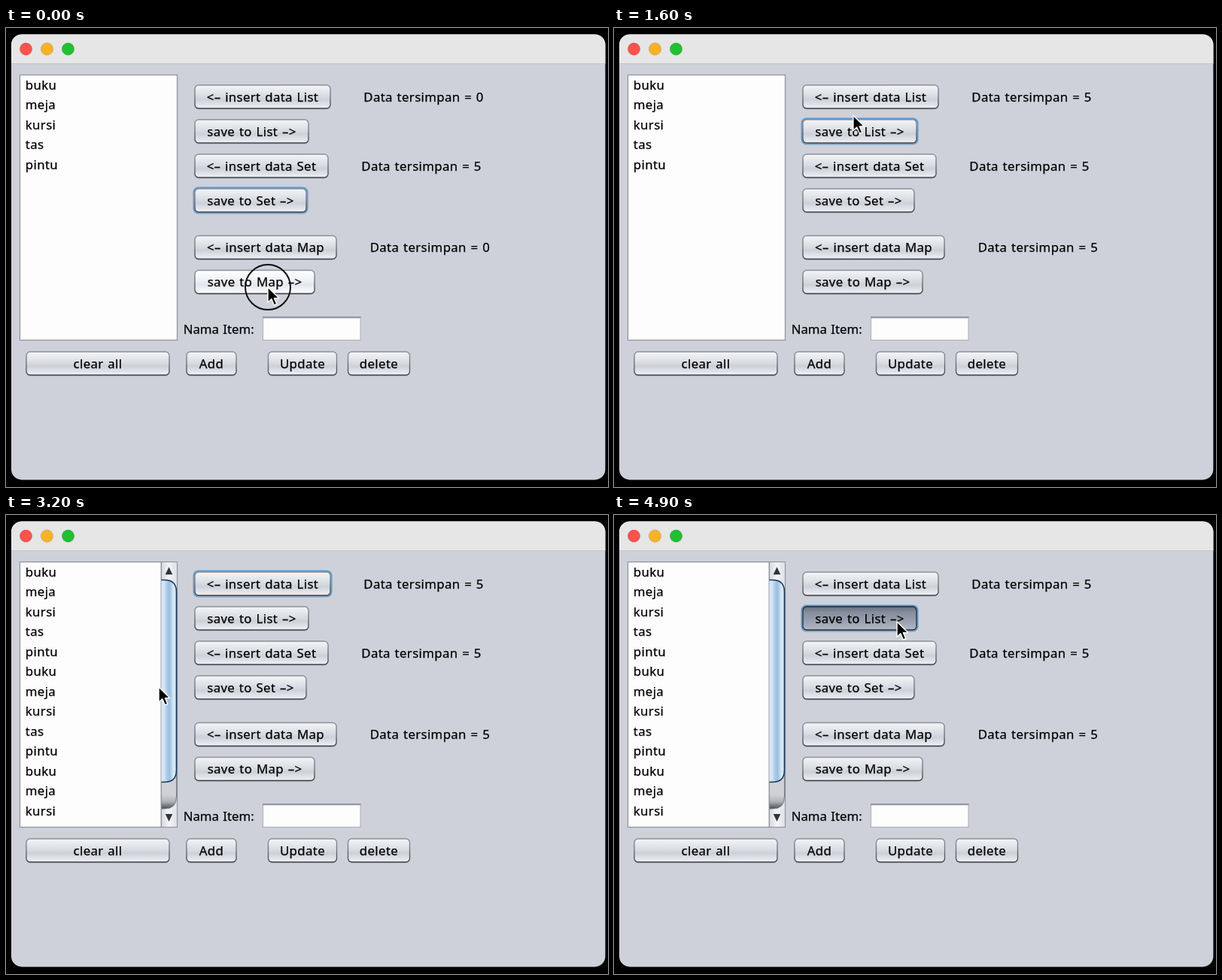
An HTML page that plays this animation: 800 by 611 pixels, repeating every 5 s.

```html
<!DOCTYPE html>
<html lang="id">
<head>
<meta charset="utf-8">
<title>Collections demo</title>
<style>
html, body { margin: 0; width: 100%; height: 100%; overflow: hidden; background: #000; }
svg { display: block; width: 800px; height: 611px; }
text {
  font: 16.8px "Noto Sans", "Open Sans", sans-serif;
  letter-spacing: .36px; word-spacing: 1px; fill: #000; stroke: #000; stroke-width: .25px;
}
.mid { text-anchor: middle; }
</style>
</head>
<body>
<svg id="stage" viewBox="0 0 800 611" xmlns="http://www.w3.org/2000/svg"></svg>
<script>
const LOOP = 5000, STEP = 100;
const ROW = 26.46, SCROLL = 44, THUMB_TOP = 86.5, TRAVEL = 35.5, THUMB_H = 269;
const words = ["buku", "meja", "kursi", "tas", "pintu"];
const stage = document.getElementById("stage");

// name: x, y, width, label
const buttons = {
  insList: [250.5, 75.5, 181, "<– insert data List"],
  saveList: [250.5, 121.5, 152, "save to List –>"],
  insSet: [250.5, 167.5, 178, "<– insert data Set"],
  saveSet: [250.5, 213.5, 149, "save to Set –>"],
  insMap: [250.5, 276, 189, "<– insert data Map"],
  saveMap: [250.5, 322, 160, "save to Map –>"],
  clear: [26.5, 430.5, 191, "clear all"],
  add: [239.5, 430.5, 67, "Add"],
  update: [348, 430.5, 92, "Update"],
  del: [454, 430.5, 83, "delete"]
};
const BTN_H = 32;

// time, x, y of the pointer tip
const path = [
  [0, 348, 345], [300, 348, 345], [700, 320, 129], [1400, 320, 129],
  [1900, 314, 93], [2800, 314, 93], [3200, 203, 229], [3400, 221, 231],
  [3500, 221, 231], [3900, 227, 267], [4000, 227, 267], [4200, 224, 229],
  [4400, 360, 155], [4700, 376, 142], [5000, 376, 142]
];
const rings = [[0, 300], [700, 900], [2200, 2400], [2500, 2700], [3400, 4200]];
const presses = [
  [100, 300, "saveMap"], [800, 900, "saveList"], [2300, 2400, "insList"],
  [2600, 2700, "insList"], [4900, 5000, "saveList"]
];
const focusAt = [[0, "saveSet"], [100, "saveMap"], [800, "saveList"], [2300, "insList"], [4900, "saveList"]];

const gradient = (id, stops, across) =>
  `<linearGradient id="${id}" x1="0" y1="0" x2="${across ? 1 : 0}" y2="${across ? 0 : 1}">` +
  stops.map(([at, color]) => `<stop offset="${at}" stop-color="${color}"/>`).join("") +
  "</linearGradient>";
const rect = (x, y, w, h, attrs) => `<rect x="${x}" y="${y}" width="${w}" height="${h}" ${attrs}/>`;
const label = (x, y, text, attrs = "") => `<text x="${x}" y="${y}" ${attrs}>${text.replace("<", "&lt;")}</text>`;

// flat on the left, rounded on the right
const curve = (y, h) =>
  `M206.5 ${y}H211Q226.5 ${y} 226.5 ${y + 16}V${y + h - 16}Q226.5 ${y + h} 211 ${y + h}H206.5`;

function button(name) {
  const [x, y, w, text] = buttons[name];
  return `<g id="${name}">` +
    rect(x - .8, y - .8, w + 1.6, BTN_H + 1.6, 'rx="6" fill="none" stroke="#5f9bd1" stroke-width="2.4" class="focus"') +
    rect(x + .5, y + 1.5, w - 1, BTN_H - 1, 'rx="5" fill="none" stroke="#afb3bc"') +
    rect(x + .5, y + .5, w - 1, BTN_H - 1, 'rx="5" fill="url(#plain)" stroke="url(#edge)" stroke-width="1.3" class="face"') +
    label(x + w / 2, y + 22, text, 'class="mid"') + "</g>";
}

function scrollbar() {
  return '<g id="bar">' +
    rect(206, 63, 21, 352, 'fill="url(#barBase)"') +
    `<path d="${curve(86.5, 304.5)}" fill="url(#track)" stroke="#777b84"/>` +
    '<path d="M206.2 62.5V415.5" stroke="#6e727a"/>' +
    `<path id="thumb" d="${curve(0, THUMB_H)}" stroke="#173a60" stroke-width="1.5"/>` +
    '<path d="M211.7 79.3L216.5 69.3L221.3 79.3ZM211.7 398L216.5 408L221.3 398Z" fill="#30343a"/></g>';
}

stage.innerHTML = "<defs>" +
  gradient("plain", [[0, "#f5f6f8"], [.1, "#eef0f3"], [.5, "#d7dae0"], [.62, "#cdd0d7"], [1, "#eff1f5"]]) +
  gradient("hover", [[0, "#ffffff"], [.4, "#f0f2f6"], [.62, "#e3e6ed"], [1, "#ffffff"]]) +
  gradient("down", [[0, "#687080"], [.25, "#868d9c"], [.55, "#959cab"], [1, "#b2b8c5"]]) +
  gradient("edge", [[0, "#8c9098"], [.5, "#6c7078"], [1, "#3c4047"]]) +
  gradient("barBase", [[0, "#d5d8de"], [.5, "#f3f4f7"], [1, "#dee0e6"]], true) +
  gradient("track", [[0, "#6d7077"], [.025, "#b6b9c0"], [.06, "#d3d5da"], [.94, "#cfd1d7"], [.97, "#adb0b7"], [1, "#4b4e55"]]) +
  gradient("blue", [[0, "#e3edf7"], [.2, "#d0e1f2"], [.4, "#a9c8e6"], [.55, "#9cbddf"], [.68, "#bcd7ee"], [.85, "#deedf9"], [1, "#b7d2ea"]], true) +
  gradient("blueHover", [[0, "#eef5fc"], [.25, "#dbe9f7"], [.5, "#b3d0ec"], [.7, "#cbe2f5"], [.85, "#e8f4fd"], [1, "#c4dcf1"]], true) +
  gradient("blueDown", [[0, "#305c8d"], [.3, "#4b7db3"], [.6, "#41719f"], [1, "#6a9bc9"]], true) +
  '<clipPath id="listClip"><rect id="listArea" x="19" y="63" width="208" height="352"/></clipPath>' +
  '<clipPath id="win"><rect x="7" y="8.4" width="789.4" height="593" rx="14"/></clipPath></defs>' +
  rect(0, 0, 800, 611, 'fill="#000"') +
  '<g clip-path="url(#win)">' + rect(7, 8, 790, 594, 'fill="#ced1d9"') +
  rect(7, 8, 790, 39, 'fill="#e6e6e6"') + rect(7, 47, 790, 1, 'fill="#c3c4c8"') + "</g>" +
  ["#ff544d", "#fbb128", "#22bf33"].map((c, i) =>
    `<circle cx="${26.5 + 28 * i}" cy="28" r="8.2" fill="${c}" stroke="#000" stroke-opacity=".12"/>`).join("") +
  rect(18.5, 62.5, 209, 353, 'fill="#fdfdfd" stroke="#8d929c" stroke-width="1.2"') +
  '<g clip-path="url(#listClip)"><g id="rows">' +
  Array.from({ length: 15 }, (_, i) => label(25.8, 82 + ROW * i, words[i % 5])).join("") + "</g></g>" +
  scrollbar() +
  Object.keys(buttons).map(button).join("") +
  label(475.3, 97.5, "", 'id="nList"') + label(472.3, 189.5, "", 'id="nSet"') + label(483.7, 298, "", 'id="nMap"') +
  label(235.7, 406.5, "Nama Item:", 'style="letter-spacing:0"') +
  rect(341.5, 385, 129.5, 30.5, 'fill="#fdfdfd" stroke="#a9adb5"') +
  '<path d="M341 385H471.5" stroke="#858990" stroke-width="1.5"/><path d="M342 386.5H471" stroke="#d5d7db"/>' +
  '<g id="pointer"><circle id="ring" r="30" fill="none" stroke="#0a0a0a" stroke-width="1.9"/>' +
  '<path d="M0 0V20.3L4.8 15.8L8.3 24L11.8 22.5L8.4 14.6H14.6Z" fill="#000" stroke="#fff" stroke-width="1.4" stroke-linejoin="round"/></g>';

const el = id => document.getElementById(id);
const within = (t, [a, b]) => t >= a && t < b;
const show = (node, on) => node.setAttribute("visibility", on ? "visible" : "hidden");

function pointerAt(t) {
  const i = path.findIndex(p => p[0] > t);
  const [t0, x0, y0] = path[i - 1], [t1, x1, y1] = path[i];
  const u = (t - t0) / (t1 - t0), e = u * u * (3 - 2 * u);
  return [x0 + (x1 - x0) * e, y0 + (y1 - y0) * e];
}

function paintButtons(t, x, y) {
  const press = presses.find(p => within(t, p));
  const focused = focusAt.filter(f => f[0] <= t).pop()[1];
  for (const name in buttons) {
    const [bx, by, bw] = buttons[name], node = el(name);
    const over = x >= bx && x <= bx + bw && y >= by - 1 && y <= by + BTN_H + 3;
    const down = press && press[2] === name;
    const face = node.querySelector(".face");
    face.setAttribute("fill", `url(#${down ? "down" : over ? "hover" : "plain"})`);
    face.setAttribute("stroke", down ? "#252a33" : "url(#edge)");
    show(node.querySelector(".focus"), focused === name);
  }
}

function paintList(t, x, y) {
  const count = t < 2400 ? 5 : t < 2700 ? 10 : 15;
  const dragging = within(t, [3500, 4300]);
  const pos = dragging ? Math.min(1, Math.max(0, (y - 231) / 36)) : 0;
  [...el("rows").children].forEach((row, i) => show(row, i < count));
  el("rows").setAttribute("transform", `translate(0 ${-SCROLL * pos})`);
  show(el("bar"), count > 10);
  el("listArea").setAttribute("width", count > 10 ? 187 : 208);
  const over = x >= 206 && x <= 227 && y > 86 && y < 391;
  el("thumb").setAttribute("transform", `translate(0 ${THUMB_TOP + TRAVEL * pos})`);
  el("thumb").setAttribute("fill", `url(#${dragging && t < 4200 ? "blueDown" : over ? "blueHover" : "blue"})`);
}

function draw(ms) {
  const t = Math.floor(ms % LOOP / STEP) * STEP;
  const [x, y] = pointerAt(t);
  paintButtons(t, x, y);
  paintList(t, x, y);
  const counts = { nList: t < 900 ? 0 : 5, nSet: 5, nMap: t < 300 ? 0 : 5 };
  for (const id in counts) el(id).textContent = "Data tersimpan = " + counts[id];
  el("pointer").setAttribute("transform", `translate(${x} ${y})`);
  show(el("ring"), rings.some(r => within(t, r)));
}

const start = performance.now();
function tick() {
  draw(performance.now() - start);
  requestAnimationFrame(tick);
}
tick();
</script>
</body>
</html>
```
